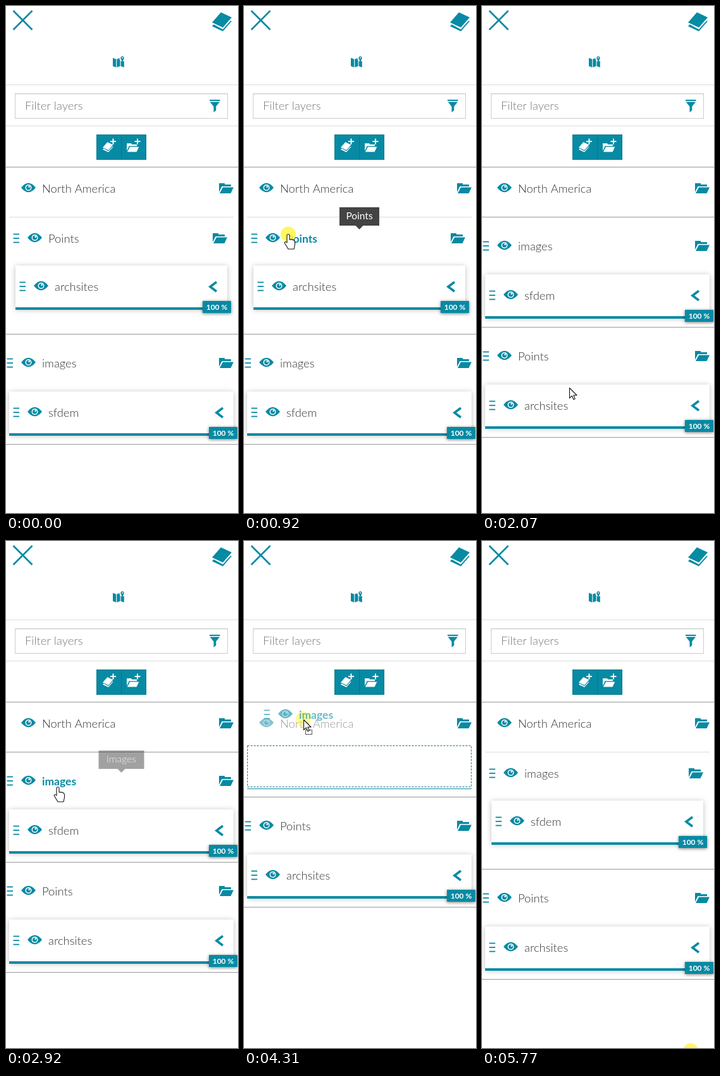
An HTML page with a canvas that plays this animation: 367 px wide and 801 px high, repeating every 5.84 s.

```html
<!DOCTYPE html>
<html lang="en">
<head>
<meta charset="utf-8">
<title>Layer tree</title>
<style>
html, body { margin: 0; width: 100%; height: 100%; overflow: hidden; background: #fff; }
canvas { display: block; }
</style>
</head>
<body>
<canvas id="stage" width="367" height="801"></canvas>
<script>
const ctx = document.getElementById('stage').getContext('2d');
const LOOP = 5840, STEP = 76.92, LEAD = 14;
const TEAL = '#078aa3', INK = '#333', RULE = '#999', PALE = '#ddd';
const FONT = 'Lato, "Open Sans", sans-serif';
const CHILD = { Points: 'archsites', images: 'sfdem' };
const GROUP_HEIGHT = 174, SLOT_HEIGHT = 71;

const linear = u => u;
const smooth = u => u * u * (3 - 2 * u);
const easeIn = u => u ** 1.6;

// Each pointer move runs between two steps and ends at x, y.
const MOVES = [
  { from: 2, to: 8, x: 70, y: 361, ease: smooth },
  { from: 13, to: 16, x: 137, y: 549, ease: easeIn },
  { from: 16, to: 23, x: 138, y: 603, ease: u => 1 - (1 - u) ** 2 },
  { from: 30, to: 37, x: 82, y: 389, ease: smooth },
  { from: 42, to: 46, x: 92, y: 337, ease: smooth },
  { from: 48, to: 56, x: 94, y: 282, ease: smooth },
  { from: 60, to: 65, x: 204, y: 547, ease: easeIn },
  { from: 65, to: 72, x: 330, y: 806, ease: linear }
];

function pointerAt(n) {
  let x = -4, y = 584;
  for (const move of MOVES) {
    const u = move.ease(Math.min(1, Math.max(0, (n - move.from) / (move.to - move.from))));
    x += (move.x - x) * u;
    y += (move.y - y) * u;
  }
  return { x, y };
}

const within = (n, from, to) => n >= from && n < to;

function saved(draw) {
  ctx.save();
  draw();
  ctx.restore();
}

function faded(alpha, draw) {
  saved(() => {
    ctx.globalAlpha *= alpha;
    draw();
  });
}

function at(x, y, draw, scale = 1) {
  saved(() => {
    ctx.translate(x, y);
    ctx.scale(scale, scale);
    draw();
  });
}

function rect(x, y, w, h, color) {
  ctx.fillStyle = color;
  ctx.fillRect(x, y, w, h);
}

function frame(x, y, w, h, color, dash = []) {
  ctx.strokeStyle = color;
  ctx.lineWidth = 1;
  ctx.setLineDash(dash);
  ctx.strokeRect(x + 0.5, y + 0.5, w - 1, h - 1);
  ctx.setLineDash([]);
}

function raised(x, y, w, h, color, shade, blur) {
  saved(() => {
    ctx.shadowColor = `rgba(0,0,0,${shade})`;
    ctx.shadowBlur = blur;
    ctx.shadowOffsetY = 1;
    rect(x, y, w, h, color);
  });
}

function trace(points) {
  ctx.beginPath();
  for (let i = 0; i < points.length; i += 2) ctx.lineTo(points[i], points[i + 1]);
}

function poly(color, ...points) {
  trace(points);
  ctx.fillStyle = color;
  ctx.fill();
}

function line(color, width, ...points) {
  trace(points);
  ctx.strokeStyle = color;
  ctx.lineWidth = width;
  ctx.stroke();
}

function disc(x, y, r, color) {
  ctx.beginPath();
  ctx.arc(x, y, r, 0, Math.PI * 2);
  ctx.fillStyle = color;
  ctx.fill();
}

function text(str, x, y, color, font, align = 'left') {
  ctx.font = font + ' ' + FONT;
  ctx.textAlign = align;
  ctx.fillStyle = color;
  ctx.fillText(str, x, y);
}

function rule(y, color = RULE, x = 0, w = 367) {
  rect(x, y, w, 1, color);
}

function layersIcon(color, back) {
  const sheet = (y, grow, fill) => poly(fill,
    -grow, y + 16, 14, y - grow, 31 + grow, y + 8, 17, y + 24 + grow);
  sheet(6, 0, color);
  sheet(0, 3, back);
  sheet(0, 0, color);
}

function folderIcon(color) {
  rect(0, 0, 9, 3, color);
  rect(0, 2, 19, 3, color);
  poly(color, 0, 5, 4.5, 5, 0, 14);
  poly(color, 6, 6.5, 23, 6.5, 18.5, 16, 1, 16);
}

function mapIcon() {
  for (let i = 0; i < 3; i++) {
    const x = i * 6.3, dip = i % 2 ? -1 : 1;
    poly(TEAL, x, 4 - dip, x + 5.2, 4 + dip, x + 5.2, 17 + dip, x, 17 - dip);
  }
  disc(15, 4, 4.5, '#fff');
  poly(TEAL, 12.5, 4, 17.5, 4, 15, 10);
  disc(15, 3, 2.6, TEAL);
  disc(15, 3, 1, '#fff');
}

function plusIcon(x, y) {
  rect(x - 4.5, y - 1, 9, 2, '#fff');
  rect(x - 1, y - 4.5, 2, 9, '#fff');
}

function eyeIcon() {
  ctx.beginPath();
  ctx.moveTo(-11.5, 0);
  ctx.quadraticCurveTo(0, -14.5, 11.5, 0);
  ctx.quadraticCurveTo(0, 14.5, -11.5, 0);
  ctx.fillStyle = TEAL;
  ctx.fill();
  disc(0, 0, 5, '#fff');
  disc(0, 0, 3.5, TEAL);
  disc(1.2, -1.4, 1.4, '#fff');
}

function gripIcon(x, y) {
  for (let i = -1; i < 2; i++) rect(x, y + i * 6.5 - 0.9, 9.5, 1.8, TEAL);
}

function label(name, x, y, hot) {
  text(name, x, y + 6, hot ? TEAL : INK, (hot ? 'bold 17.5px' : '300 18.4px'));
}

function row(name, inset, y, hot, grip = true) {
  if (grip) gripIcon(inset + 1.5, y - 1);
  at(inset + 35.5, y - 2, eyeIcon);
  label(name, inset + 57, y, hot);
}

function card(name, inset, top) {
  const bottom = top + 70, right = 370 - inset, y = top + 34;
  raised(inset - 5, top, right - inset + 5, 69, '#fff', 0.25, 8);
  rect(inset - 5, bottom - 4, right - inset + 5, 4, TEAL);
  row(name, inset, y);
  line(TEAL, 3.6, right - 17, y - 8, right - 27, y - 0.5, right - 17, y + 7);
  raised(right - 39, bottom - 14, 45, 19, TEAL, 0.5, 5);
  text('100 %', right - 16.5, bottom, '#fff', 'bold 12px', 'center');
}

function group(name, base, hot, inset = 0) {
  const y = base + 47;
  row(name, inset, y, hot);
  at(337 - inset, y - 9, () => folderIcon(TEAL));
  card(CHILD[name], inset + 10, y + 44 - inset / 5);
}

function rootGroup(name, base, hot) {
  group(name, base, hot);
  rule(base + GROUP_HEIGHT);
}

function nestedGroup(name, hot) {
  rule(333, PALE, 5, 355);
  group(name, 321, hot, 10);
  rule(518);
}

function slot(top, x, w, h) {
  frame(x, top, w, h, '#1f6f80', [3, 2]);
  rule(top + h + 2, TEAL, x, w);
}

function innerSlot(border) {
  slot(border - 81, 5, 355, 66);
  rule(border);
}

const rootSlot = border => slot(border + 4, -4, 375, 65);

function tree(n) {
  const hotPoints = within(n, 7, 14), hotImages = within(n, 37, 43);
  faded(within(n, 51, 60) ? 0.5 : 1, () => row('North America', 0, 289, false, false));
  at(337, 280, () => folderIcon(TEAL));

  if (n < 14) {
    nestedGroup('Points', hotPoints);
    rootGroup('images', 518);
  } else if (n < 15) {
    innerSlot(333 + SLOT_HEIGHT);
    rootGroup('images', 333 + SLOT_HEIGHT);
  } else if (n < 18) {
    rule(333);
    group('images', 333);
    innerSlot(333 + GROUP_HEIGHT + SLOT_HEIGHT);
  } else if (n < 43) {
    rule(333);
    rootGroup('images', 333, hotImages);
    if (n < 27) rootSlot(333 + GROUP_HEIGHT);
    else rootGroup('Points', 333 + GROUP_HEIGHT);
  } else if (n < 51) {
    rule(333);
    rootSlot(333);
    rootGroup('Points', 392);
  } else if (n < 60) {
    innerSlot(333 + SLOT_HEIGHT);
    rootGroup('Points', 333 + SLOT_HEIGHT);
  } else {
    nestedGroup('images');
    rootGroup('Points', 518);
  }
}

function header() {
  line(TEAL, 2.6, 11.5, 7.5, 41.5, 37.5);
  line(TEAL, 2.6, 41.5, 7.5, 11.5, 37.5);
  at(326, 10, () => layersIcon(TEAL, '#fff'));
  at(169, 79, mapIcon);
  rule(124, PALE);
  rule(189, PALE);
  rule(254);

  frame(14, 138, 337, 40, '#ccc');
  rule(139, '#eee', 15, 335);
  text('Filter layers', 30, 164, '#777', '300 18.4px');
  rect(322, 148, 16.5, 2, TEAL);
  poly(TEAL, 322.5, 151.5, 338, 151.5, 330.3, 161);
  poly(TEAL, 328.5, 157, 332.3, 157, 332.3, 165, 328.5, 168);

  rect(143, 203, 79, 40, TEAL);
  frame(143, 203, 79, 40, '#06788e');
  rect(182, 203, 1, 40, '#06788e');
  at(153, 215, () => layersIcon('#fff', TEAL), 0.53);
  at(191, 217, () => folderIcon('#fff'), 0.84);
  plusIcon(169.5, 214);
  plusIcon(208, 214);
}

function tooltip(name, top) {
  const x = 182.5, half = name === 'images' ? 36 : 31.5;
  rect(x - half, top, half * 2, 29, '#444');
  poly('#444', x - 6, top + 29, x + 6, top + 29, x, top + 35);
  text(name, x, top + 19, '#fff', '15.5px', 'center');
}

const ARROW = new Path2D('M.5 .5V16.5L4.3 12.9 6.9 18.7 9.3 17.6 6.8 12H12Z');
const HAND = new Path2D('M-2 13V1Q0-2 2 1V8Q10 7 10.5 12V16L9 23H0L-6 13Q-5 10-2 13Z');

function pointer(dragging, hand) {
  if (dragging) {
    rect(3, 16, 11, 8, '#fff');
    frame(3, 16, 11, 8, '#000', [2, 1]);
  }
  const shape = hand ? HAND : ARROW;
  ctx.fillStyle = '#fff';
  ctx.strokeStyle = '#111';
  ctx.lineWidth = 1.1;
  ctx.lineJoin = 'round';
  ctx.fill(shape);
  ctx.stroke(shape);
}

function render(time) {
  const n = Math.floor((time + LEAD) / STEP);
  rect(0, 0, 367, 801, '#fff');
  header();
  tree(n);

  if (within(n, 8, 13)) faded(n === 8 ? 0.5 : 1, () => tooltip('Points', 318));
  if (within(n, 38, 42)) faded(n === 38 ? 0.5 : 1, () => tooltip('images', 331));

  if (n < 2) return;
  const { x, y } = pointerAt(n);
  const dragPoints = within(n, 14, 25), dragImages = within(n, 43, 58);
  const pressed = within(n, 11, 25) || within(n, 41, 58) || n >= 75;
  if (pressed) disc(x, y - 0.5, 12, `rgba(255,246,70,${dragImages ? 0.55 : 0.85})`);
  if (dragPoints) faded(0.5, () => row('Points', x - 47, y + 15));
  if (dragImages) faded(0.6, () => row('images', x - 64, y - 7, true));
  const hand = within(n, 7, 14) || within(n, 37, 43);
  at(x, y, () => pointer(dragPoints || dragImages, hand));
}

const start = performance.now();
function tick() {
  render((performance.now() - start) % LOOP);
  requestAnimationFrame(tick);
}
tick();
</script>
</body>
</html>
```
